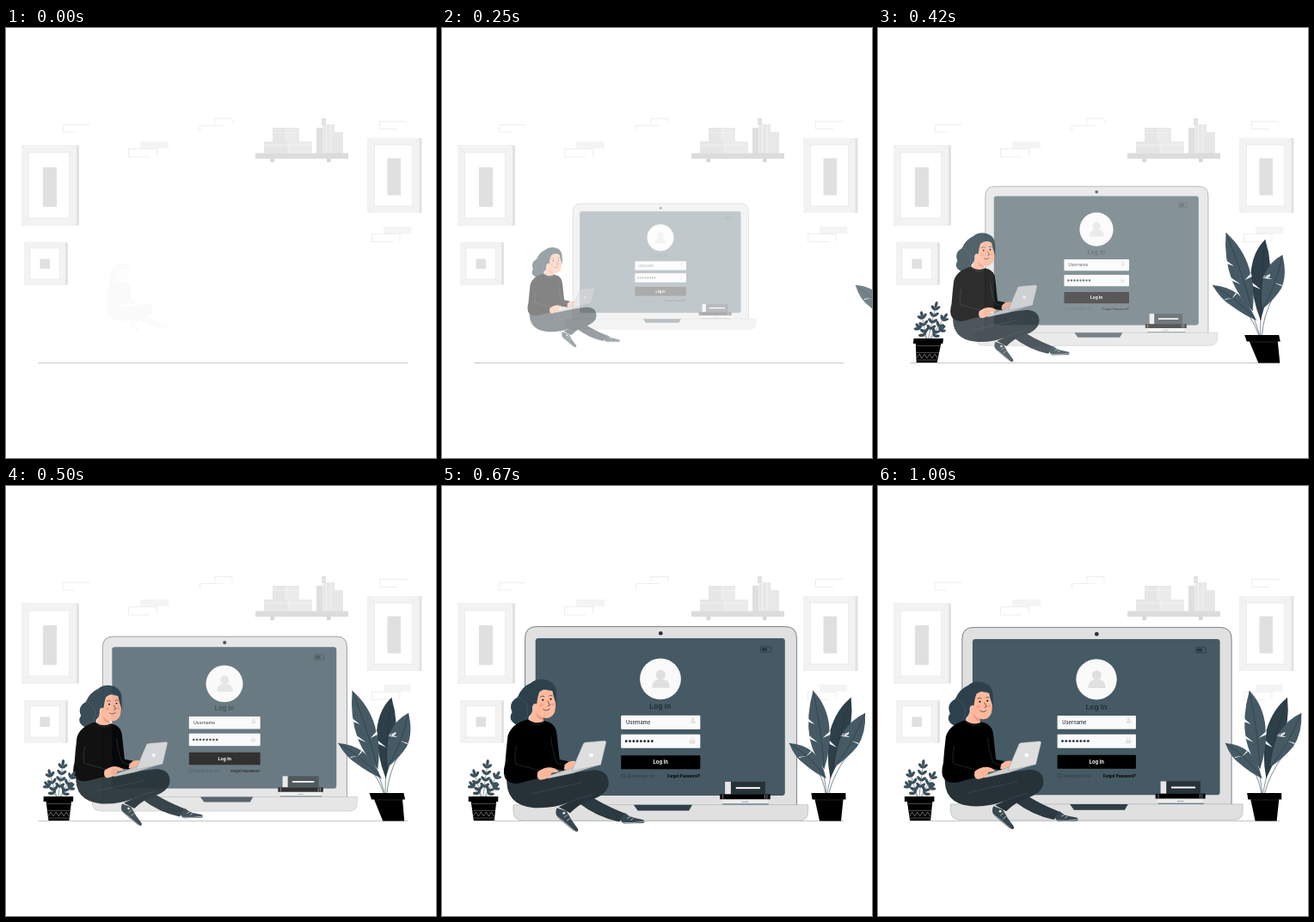
Recreate the animation shown at these times as an HTML page. Size 500x500 px, loop 1.04 s.

```html
<!DOCTYPE html>
<html lang="en">
<head>
<meta charset="utf-8">
<title>Log in</title>
<style>
  html, body { margin: 0; width: 100%; height: 100%; overflow: hidden; background: #fff; }
  svg { display: block; width: 100%; height: 100%; font-family: Inter, "Open Sans", sans-serif; }
</style>
</head>
<body>
<svg viewBox="0 0 500 500">
  <g id="frames"></g>

  <g fill="none" stroke="#e3e3e3" stroke-width=".6">
    <path d="M97 112.500H66.500V121H80M142.500 150V140.500H175.500V149M142.500 150H167"/>
    <path d="M225.500 120V113.500H252M243 111V105.500H263V111"/>
    <path d="M466 108.500H434.500V117.500H455M425.500 248.500V239.500H458V248M425.500 248.500H450"/>
  </g>
  <path d="M156 132h33v8h-33zM439 231h32v8h-32z" fill="#f4f4f4"/>

  <g id="shelf">
    <path d="M307.500 151h4.500v5h-4.500zM373 151h4.500v5h-4.500z" fill="#d6d6d6"/>
    <path d="M310 116h31v16h-31zM300 132h56v13.500h-56z" fill="#ebebeb"/>
    <path d="M310 116h15v16h-15zM300 132h28v13.500h-28z" fill="#e6e6e6"/>
    <path d="M310 121.500h31M325 116v16M328 132v13M300 136h56" stroke="#f7f7f7" stroke-width=".6"/>
    <path d="M361 116h7.500v30h-7.500zM367 105h5v8h-5z" fill="#dfdfdf"/>
    <path d="M368.500 112h13.500v34h-13.500zM382 121h10v25h-10z" fill="#e8e8e8"/>
    <path d="M372.500 112v33M378 112v33M367 109h5" stroke="#f7f7f7" stroke-width=".7"/>
    <path d="M290 145.500h108v6.500h-108z" fill="#dcdcdc"/>
  </g>

  <path d="M37.500 389.500H467" stroke="#b8b8b8" stroke-width=".8"/>

  <g id="laptop">
    <path d="M92.500 374V174.500Q92.500 160.500 106.500 160.500H402.500Q416.500 160.500 416.500 174.500V374Z"
      fill="#e0e0e0" stroke="#263238" stroke-width=".6"/>
    <rect x="105" y="174.500" width="297.500" height="187.500" rx="3.500" fill="#455a64"/>
    <circle cx="254.300" cy="168.500" r="2.400" fill="#263238"/>
    <path d="M78.500 373H430V381Q430 392 419 392H91Q78.500 392 78.500 380Z"
      fill="#e0e0e0" stroke="#9a9fa2" stroke-width=".5"/>
    <path d="M222 373H292L288 380H227Z" fill="#2f3f48"/>

    <rect x="373.500" y="184.500" width="12" height="6.500" rx="1" fill="none" stroke="#263238" stroke-width=".7"/>
    <rect x="375" y="186" width="6" height="3.500" fill="#263238"/>

    <circle cx="254" cy="223" r="24.500" fill="#fafafa"/>
    <g id="user" fill="#e0e0e0">
      <circle cx="254.300" cy="218" r="5.800"/>
      <path d="M244 233.500Q244 224.500 251 223.500H258Q265 224.500 265 233.500Z"/>
    </g>
    <text x="254" y="259" text-anchor="middle" font-size="8.400" font-weight="700" letter-spacing=".2" fill="#263238">Log In</text>

    <rect x="207" y="266.500" width="94.500" height="16.500" rx="1" fill="#fafafa"/>
    <text x="213" y="276.800" font-size="5.900" font-weight="500" fill="#263238">Username</text>
    <use href="#user" transform="translate(216.500 205.500) scale(.3)"/>
    <rect x="207" y="289" width="94.500" height="16.500" rx="1" fill="#fafafa"/>
    <g id="dots" fill="#263238"></g>
    <path d="M289 296h6.500v4h-6.500z" fill="#e0e0e0"/>
    <path d="M290.500 296v-1.500a1.700 1.700 0 0 1 3.500 0v1.500" fill="none" stroke="#e0e0e0" stroke-width=".8"/>
    <rect x="207" y="314" width="94.500" height="16.500" rx="1"/>
    <text x="254.200" y="324.500" text-anchor="middle" font-size="6" font-weight="700" fill="#fff">Log In</text>
    <rect x="207.300" y="336.800" width="4" height="4" rx=".6" fill="none" stroke="#263238" stroke-width=".5"/>
    <text x="214" y="340.700" font-size="4.900" fill="#2b3a42">Remember me</text>
    <text x="301.500" y="340.700" text-anchor="end" font-size="4.500" font-weight="700">Forgot Password?</text>

    <path d="M328 366h54v6h-54z" fill="#ededed"/>
    <path d="M328 372.300h55" stroke="#455a64" stroke-width="1"/>
    <path d="M351 369.500h8" stroke="#455a64" stroke-width=".5"/>
    <path d="M331 345.500h48v15h-48z" fill="#263238"/>
    <path d="M331 345.500h7v15h-7z" fill="#e6e6e6"/>
    <path d="M344 353h29" stroke="#fff" stroke-width="2"/>
    <path d="M325 360.500h60v6h-60z"/>
    <path d="M328.500 361v5M381 361v5M378.500 361v5" stroke="#bbb" stroke-width=".7"/>
  </g>

  <g id="girl">
    <path d="M104 356Q140 348 165 354Q180 367 213 380L205 389Q180 384 158 367Z" fill="#2b3940"/>
    <path d="M212 379Q217 384 225 385L232 386.500Q236 389 232 390.500L210 391Q203 387 212 379Z" fill="#37474f"/>
    <path d="M207 389.800Q220 391 234 388.600M214 385l4-2M218 387l3-2" fill="none" stroke="#e0e0e0" stroke-width=".7"/>
    <path d="M134 373L145 377Q150 387 158 397Q159 402 153 399L135 384Q131 379 134 373Z" fill="#37474f"/>
    <path d="M133 382Q143 389 155 400M142 384l4-3M145 388l4-3" fill="none" stroke="#e0e0e0" stroke-width=".7"/>
    <circle cx="142" cy="379" r="1.500" fill="#e0e0e0"/>
    <path d="M77 337Q74 370 108 373Q130 374 147 367L136 372L149 379Q160 368 172 364Q192 358 193 345Q193 331 177 330L128 336Z" fill="#263238"/>
    <path d="M104 357Q140 349 163 344M147 367Q160 361 174 358" fill="none" stroke="#455a64" stroke-width=".5"/>

    <path d="M107 233Q114 238 131 240Q134 252 131.500 264Q127 273 118 270L119 277Q111 285 101 276L107 260Z" fill="#ffb99d"/>
    <path d="M110 264Q113 269 118 270L118.500 274Q110 271 110 264Z" fill="#ed9a80"/>
    <path d="M104 231Q112 224 124 228Q134 232 133.500 245L134 257Q130 247 129 240Q121 235 114 241Q112 246 111 255Q107 253 106 258Q107 264 102 269Q101 281 89 279Q77 273 83 264Q78 253 89 247Q94 235 104 231Z" fill="#2d414c"/>
    <path d="M90 247Q99 250 101 260Q101 266 98 272" fill="none" stroke="#50646f" stroke-width=".5"/>
    <ellipse cx="109.500" cy="258" rx="2.600" ry="3.500" fill="#ffb99d"/>
    <circle cx="118" cy="250" r="1"/>
    <circle cx="127" cy="249" r="1"/>
    <path d="M115 246.500q3-2 5 0M125 245.500q2-1.500 4 0M123.500 251l2.500 5-2.500 .8M118 260.500q4 3 8-.5" fill="none" stroke="#263238" stroke-width=".7"/>
    <path d="M113.500 256a2.500 1.800 0 1 0 5 0a2.500 1.800 0 1 0-5 0M127 255a2 1.600 0 1 0 4 0a2 1.600 0 1 0-4 0" fill="#ff8f7c" opacity=".6"/>

    <path d="M101 272Q110 279 120 274Q133 276 134 290L137 318L147 320L144 331L132 329L118 330L119 338L98 343Q85 348 77 342Q71 336 75 322Q76 308 78 291Q82 277 101 272Z"/>
    <path d="M88 302Q85 316 87 323L116 331M127 292Q129 310 134 322L143 325M102 274Q110 281 119 276" fill="none" stroke="#3b474d" stroke-width=".5"/>
    <path d="M143 324Q148 318 157 320L155 329Q148 332 142 329Z" fill="#ffb99d"/>
    <path d="M122 337.500L151 327.500L184 323.500L152 333.500L124 339.500Z" fill="#cfcfcf" stroke="#87939a" stroke-width=".4"/>
    <path d="M164 300Q165 298.500 167 298.300L188 296.500Q190.500 296.500 190 299L184 324L151 331Q157 316 164 300Z" fill="#dedede" stroke="#87939a" stroke-width=".4"/>
    <circle cx="173" cy="313" r="2.300" fill="#fff"/>
    <path d="M112 332Q120 326 127 327Q134 328 136 332L128 333Q127 339 117 341Q110 342 112 332Z" fill="#ffb99d"/>
    <path d="M120 333l8-1.500M120 336l6-1" stroke="#ed9a80" stroke-width=".5"/>
  </g>

  <g id="small">
    <g id="sprigs"></g>
    <path d="M31 361h34.500v6h-2L61.500 389H37.500L34 367h-3z"/>
    <path d="M35 369.500h28M36 377.500h26.500M36.500 386h25.500" stroke="#777" stroke-width=".6"/>
    <path d="M37 384l3-5 3 5 3-5 3 5 3-5 3 5 3-5 3 5" fill="none" stroke="#aaa" stroke-width=".6"/>
  </g>

  <g id="big">
    <path d="M438 318Q445 338 446 357M452 335L447 357M472 312Q455 335 449 357M436 330Q443 342 445 357" fill="none" stroke="#87939a" stroke-width="1"/>
    <path d="M477 246Q480 275 468 305Q460 322 451 340Q446 312 452 284Q460 259 477 246Z" fill="#2d3f49"/>
    <path d="M433 238Q449 255 451 280Q452 308 444 329Q432 314 428 294Q424 268 433 238Z" fill="#455a64"/>
    <path d="M493 264Q494 287 483 303Q473 315 456 327Q458 305 466 288Q477 271 493 264Z" fill="#455a64"/>
    <path d="M404 299Q420 300 431 309Q442 320 446 340Q432 333 422 324Q410 316 404 299Z" fill="#455a64"/>
    <path d="M426 270l8 7-8-3zM427 290l10 8-9-4zM452 285l-9 8 9-4zM474 286l-11 5 10-2zM451 296l8 8-8-4zM466 288l9 4-9-1zM485 299l-9-3 8 4zM429 308l-6 7 7-6zM415 315l9-1-9 2z" fill="#fff"/>
    <path d="M433 238Q442 285 444 329M477 246Q460 295 451 340M493 264Q478 300 456 327M404 299Q430 315 446 340" fill="none" stroke="#263238" stroke-width=".5"/>
    <path d="M428.500 357h40v7.500h-3L462.500 389.500H437.500L432.500 364.500h-3z"/>
    <path d="M433 365h32" stroke="#37474f" stroke-width=".5"/>
  </g>
</svg>

<script>
const $ = id => document.getElementById(id);

// Picture frame: outer box, border width, side depth, then the art inside.
function frame(x, y, w, h, b, art) {
  const [ax, ay, aw, ah] = art, r = x + w, t = y + h;
  return `<rect x="${x}" y="${y}" width="${w + 3}" height="${h}" fill="#e2e2e2"/>
    <rect x="${x}" y="${y}" width="${w}" height="${h}" fill="#f3f3f3"/>
    <path d="M${x} ${y}l${b} ${b}M${r} ${y}l${-b} ${b}M${x} ${t}l${b} ${-b}M${r} ${t}l${-b} ${-b}" stroke="#e4e4e4" stroke-width=".6"/>
    <rect x="${x + b}" y="${y + b}" width="${w - 2 * b}" height="${h - 2 * b}" fill="#fff" stroke="#e4e4e4" stroke-width=".6"/>
    <rect x="${ax}" y="${ay}" width="${aw}" height="${ah}" fill="#e0e0e0"/>`;
}
$('frames').innerHTML =
  frame(18, 136.5, 64, 93, 8.5, [43, 162, 16, 46]) +
  frame(420.5, 128, 60, 87, 8, [443.5, 151.5, 15.5, 43]) +
  frame(21.5, 249.5, 47.5, 49, 6.5, [39.5, 268.5, 11.5, 11.5]);

$('dots').innerHTML = Array.from({ length: 8 }, (_, i) =>
  `<circle cx="${213.2 + i * 4.4}" cy="297.200" r="1.500"/>`).join('');

// Stem with pairs of oval leaves and one at the tip.
function sprig(x, y, tx, ty, pairs) {
  const lean = Math.atan2(ty - y, tx - x) * 180 / Math.PI;
  const leaf = (px, py, turn) =>
    `<ellipse cx="3.400" rx="3.600" ry="1.700" transform="translate(${px} ${py}) rotate(${lean + turn})"/>`;
  let out = `<path d="M${x} ${y}L${tx} ${ty}" stroke="#455a64" stroke-width=".6"/>` + leaf(tx, ty, 0);
  for (let i = 0; i < pairs; i++) {
    const p = 0.3 + 0.62 * i / (pairs - 1), px = x + (tx - x) * p, py = y + (ty - y) * p;
    out += leaf(px, py, 48) + leaf(px, py, -48);
  }
  return `<g fill="#3c505b">${out}</g>`;
}
$('sprigs').innerHTML = sprig(48, 361, 52, 325, 4) + sprig(46, 361, 38, 336, 3) +
  sprig(50, 361, 63, 338, 3) + sprig(46, 361, 36, 349, 2) + sprig(51, 361, 61, 351, 2);

// Tracks: [step, values...], eased linearly from step to step.
const LOOP = 1040, FPS = 24;
const tracks = {
  laptop: [[1, .44, 0], [2, .45, .01], [6, .63, .325], [10, .8, .65], [12, .877, .805], [14, .937, .96],
           [15, .958, 1], [16, .975, 1], [18, .994, 1], [20, 1, 1], [22, .99, 1], [24, .967, 1]],
  girl: [[1, .46, .015], [2, .475, .1], [6, .67, .48], [10, .864, .82], [12, .94, .93], [14, .995, 1],
         [16, 1.02, 1], [18, 1.014, 1], [20, 1, 1], [22, .992, 1], [24, .988, 1]],
  big: [[1, 180, -.3, 0], [2, 165, -.25, .1], [6, 76, -.05, .75], [8, 24, .12, 1], [10, -12, .22, 1],
        [12, -15, .205, 1], [14, -7, .11, 1], [16, 0, .02, 1], [20, 0, 0, 1], [24, 0, .015, 1]],
  small: [[1, -140, .2, 0], [2, -125, .2, .1], [6, -75, .05, .75], [8, -22, -.06, 1], [10, 11.5, -.12, 1],
          [12, 13, -.03, 1], [14, 6, -.02, 1], [16, 0, -.02, 1], [20, 0, 0, 1], [24, 0, -.01, 1]]
};

function at(track, n) {
  let i = track.findIndex(k => k[0] >= n);
  if (i < 1) return track[i < 0 ? track.length - 1 : 0].slice(1);
  const a = track[i - 1], b = track[i], p = (n - a[0]) / (b[0] - a[0]);
  return a.slice(1).map((v, j) => v + (b[j + 1] - v) * p);
}

function pose(id, matrix, opacity) {
  $(id).setAttribute('transform', `matrix(${matrix.join(' ')})`);
  $(id).setAttribute('opacity', opacity);
}
function zoom(id, n, cx, cy) {
  const [s, o] = at(tracks[id], n);
  pose(id, [s, 0, 0, s, cx * (1 - s), cy * (1 - s)], o);
}
function slide(id, n, cy) {
  const [dx, skew, o] = at(tracks[id], n);
  pose(id, [1, 0, skew, 1, dx - skew * cy, 0], o);
}

function draw(now) {
  const t = now % LOOP;
  const n = Math.min(24, Math.floor((t + 5) * FPS / 1000));
  zoom('laptop', n, 254, 279);
  zoom('girl', n, 152.5, 313);
  slide('big', n, 313);
  slide('small', n, 353);
}

const start = performance.now();
function tick() {
  draw(performance.now() - start);
  requestAnimationFrame(tick);
}
tick();
</script>
</body>
</html>
```
